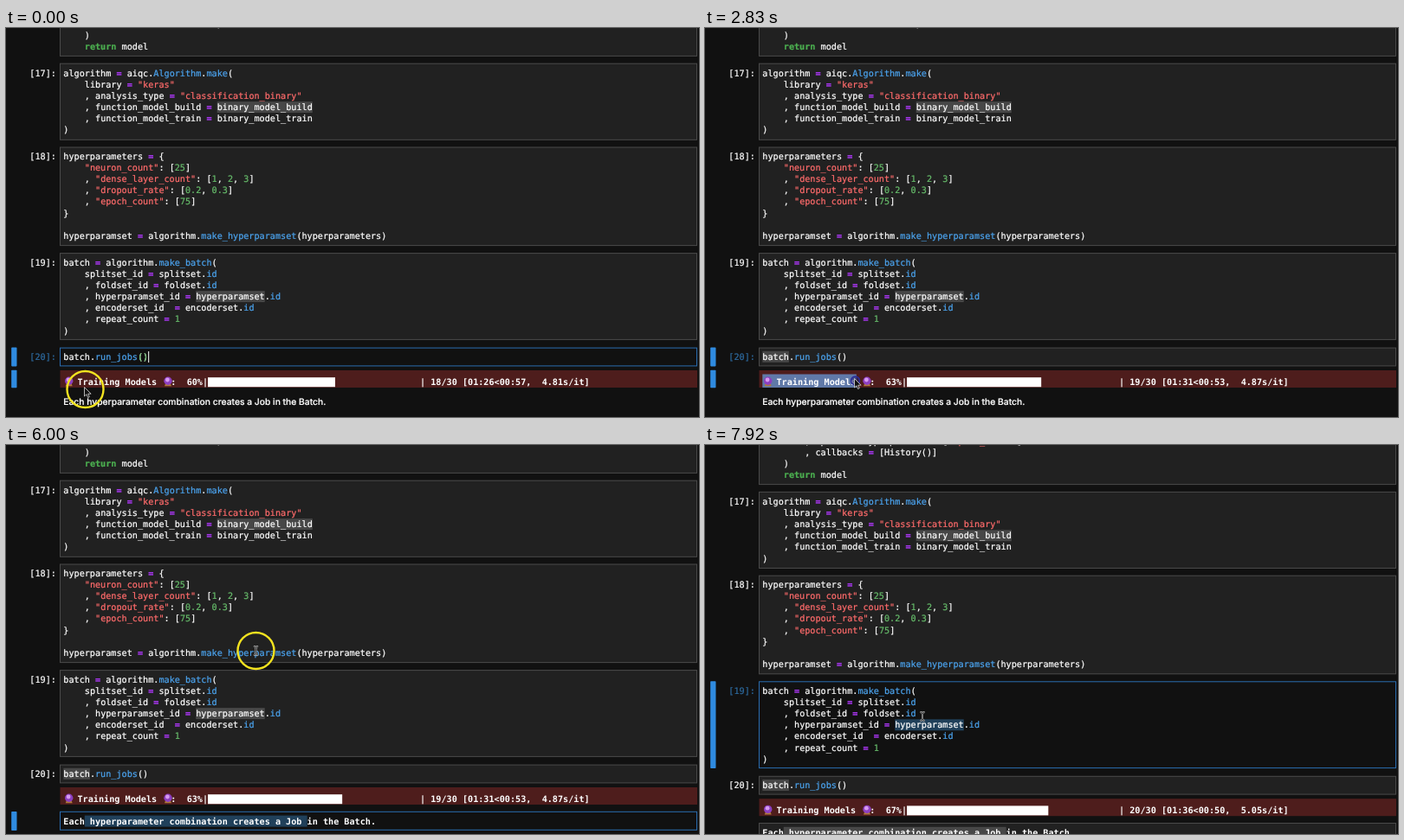
These frames come from a looping animation (800 px wide and 450 px high, 8000 ms). An HTML page:

```html
<!DOCTYPE html>
<html lang="en">
<head>
<meta charset="utf-8">
<title>Notebook training run</title>
<style>
  html, body { margin: 0; width: 100%; height: 100%; overflow: hidden; background: #111; }
  svg { display: block; width: 800px; height: 450px; }
  text {
    font: 10.16px "DejaVu Sans Mono", monospace; white-space: pre; text-rendering: geometricPrecision;
    color: #fff; fill: currentColor; stroke: currentColor; stroke-width: .22;
  }
  tspan { fill: currentColor; stroke: currentColor; }
  .bold { font-weight: 700; stroke-width: 0; }
  .prose { font: 500 10.3px Inter, sans-serif; }
  .str { color: #ff6b6b; }
  .num { color: #66bb6a; }
  .op { color: #b238ff; font-weight: 700; }
  .prop { color: #4ba3ee; }
  .key { color: #4caf50; font-weight: 700; }
  .box { fill: #212121; stroke: #4a4a4a; }
  .box.edit { fill: #111; stroke: #2a6db0; }
  .prompt.active { color: #2d6a9f; }
  .tab { fill: #2f8be0; }
</style>
</head>
<body>
<svg id="stage" viewBox="0 0 800 450"><g id="page"></g><g id="mouse"></g></svg>
<script>
const LOOP = 8000, FPS = 12;
const CHAR = 6.117, LINE = 13.18, LEFT = 66.3, BASE = 3.5;
const GREY = '#474747', SLATE = '#20405a';
const page = document.getElementById('page');
const mouse = document.getElementById('mouse');

function add(parent, tag, attrs, content) {
  const el = document.createElementNS('http://www.w3.org/2000/svg', tag);
  set(el, attrs);
  if (content) el.textContent = content;
  parent.append(el);
  return el;
}
function set(el, attrs) {
  for (const k in attrs) el.setAttribute(k, attrs[k]);
}
const show = (el, on) => { el.style.display = on ? '' : 'none'; };
const rect = (x, y, width, height, attrs) => add(page, 'rect', { x, y, width, height, ...attrs });
const sideTab = (y, height) => rect(6.2, y, 6.3, height, { class: 'tab', rx: .8 });
const text = (x, y, content, cls = '') => add(page, 'text', { x, y: y + BASE, class: cls }, content);
const col = n => LEFT + n * CHAR;
const mark = (from, count, y, fill) => rect(col(from), y - 6.4, count * CHAR, 13, { fill });

const TOKENS = /(["'][^"']*["'])|(\breturn\b)|(=)|(\b\d[\d.]*)|(\.)([A-Za-z_]+)|[^"'=.\d\s]+|\s+|./g;
function code(y, line) {
  const indent = line.search(/\S/);
  const el = text(col(indent), y, '');
  const span = (s, cls) => add(el, 'tspan', { class: cls || '' }, s);
  for (const [all, str, key, op, num, dot, prop] of line.trim().matchAll(TOKENS)) {
    if (dot) { span('.'); span(prop, 'prop'); }
    else span(all, str ? 'str' : key ? 'key' : op ? 'op' : num ? 'num' : '');
  }
}

// A notebook cell: frame, prompt, side tab, then highlights below the code
function cell(top, bottom, prompt, source, firstLine, highlights = () => {}) {
  const box = rect(62.5, top, 735, bottom - top, { class: 'box' });
  const label = text(27.3, firstLine, prompt, 'prompt');
  const tab = sideTab(top - .5, bottom - top + 1);
  const marks = highlights();
  source.split('\n').forEach((s, i) => s.trim() && code(firstLine + i * LINE, s));
  return { box, label, tab, marks };
}
function setCell(c, selected, editing) {
  c.box.classList.toggle('edit', editing);
  c.label.classList.toggle('active', selected);
  show(c.tab, selected);
}

function crystalBall(cx) {
  add(page, 'path', { d: `M${cx - 4} 414.2l1.6-4h4.8l1.6 4z`, fill: '#b07a3a' });
  add(page, 'circle', { cx, cy: 408.2, r: 4.7, fill: '#8d3fc0' });
  add(page, 'circle', { cx: cx - .6, cy: 407, r: 2.4, fill: '#d79af0' });
}

const first = cell(-60, 32.4, '', `        , epochs = hyperparameters['epoch_count']
        , callbacks = [History()]
    )
    return model`, -18.2);

const algorithm = cell(41.2, 129.3, '[17]:', `algorithm = aiqc.Algorithm.make(
    library = "keras"
    , analysis_type = "classification_binary"
    , function_model_build = binary_model_build
    , function_model_train = binary_model_train
)`, 52, () => mark(29, 18, 91.5, GREY));

const params = cell(138, 251.6, '[18]:', `hyperparameters = {
    "neuron_count": [25]
    , "dense_layer_count": [1, 2, 3]
    , "dropout_rate": [0.2, 0.3]
    , "epoch_count": [75]
}

hyperparamset = algorithm.make_hyperparamset(hyperparameters)`, 148.2);

const batch = cell(260.6, 360.4, '[19]:', `batch = algorithm.make_batch(
    splitset_id = splitset.id
    , foldset_id = foldset.id
    , hyperparamset_id = hyperparamset.id
    , encoderset_id  = encoderset.id
    , repeat_count = 1
)`, 271, () => mark(25, 13, 310.5, GREY));

const run = cell(370.1, 390.9, '[20]:', 'batch.run_jobs()', 380.2, () => mark(0, 5, 380.2, GREY));
const parens = text(col(14), 380.2, '()', 'num');
const caret = rect(col(16), 374, 1, 13, { fill: '#fff' });

rect(62.5, 396, 735.5, 20, { fill: '#4e1d1c' });
const outputTab = sideTab(395.7, 20.6);
const outputMark = rect(LEFT, 400.5, 0, 15.5, { fill: '#6079a8' });
crystalBall(72.7);
crystalBall(187);
text(82.5, 409, 'Training Models', 'bold');
const percent = text(190.3, 409, '', 'bold');
const bar = rect(233, 404.2, 0, 11, { fill: '#fff' });
const stats = text(478, 409, '', 'bold');

const SENTENCE = 'Each hyperparameter combination creates a Job in the Batch.';
const prose = text(66.3, 432.6, SENTENCE, 'prose');
const noteBox = rect(62.5, 424.3, 735, 21, { class: 'box' });
const noteTab = sideTab(424, 22);
const noteMark = mark(4, 0, 435, SLATE);
const noteText = text(LEFT, 435, SENTENCE, 'bold');

const ring = add(mouse, 'circle', { r: 21, fill: 'none', stroke: '#f2e21f', 'stroke-width': 2.4 });
const press = add(mouse, 'circle', { r: 5, fill: '#23236a', 'fill-opacity': .55, stroke: '#2c2c9c', 'stroke-width': 1.5 });
const arrow = add(mouse, 'path', { d: 'M-1-2.5v10.5l2.4-2.2 1.7 3.7 1.7-.8-1.6-3.5h3.4z', fill: '#111', stroke: '#ddd', 'stroke-width': .8 });
const beam = add(mouse, 'g', { fill: 'none' });
const BEAM = 'M-2.6-5q2.6 0 2.6 2.4V2.6q0 2.4-2.6 2.4M2.6-5q-2.6 0-2.6 2.4M2.6 5q-2.6 0-2.6-2.4';
add(beam, 'path', { d: BEAM, stroke: '#c8c8c8', 'stroke-width': 2 });
add(beam, 'path', { d: BEAM, stroke: '#222', 'stroke-width': .9 });

// time, x, y
const PATH = [
  [0, 91.5, 418], [250, 91, 417], [850, 82, 382], [1150, 82, 382], [1700, 84.5, 407],
  [1780, 84.5, 407], [1950, 67, 408], [2100, 67, 408], [2750, 173.5, 408], [3000, 173.5, 408],
  [3550, 117, 433], [3830, 117, 433], [3910, 84.5, 432], [4250, 91, 435], [4400, 91, 435],
  [5200, 348, 435], [5450, 348, 435], [5950, 288.5, 238], [6200, 288.5, 238], [6850, 251, 314], [LOOP, 251, 314]
];
const PRESSES = [[950, 1100], [2000, 2900], [3700, 3850], [4400, 5300], [6950, 7300]];
const RINGS = [[0, 750], [5450, 6800]];
const SELECT_BATCH = 1000, DRAG_OUTPUT = 1980, OPEN_NOTE = 3840, EDIT_NOTE = 4000, EDIT_BATCH = 7000;
const PROGRESS = [[0, 18, '01:26<00:57,  4.81'], [1990, 19, '01:31<00:53,  4.87'], [7000, 20, '01:36<00:50,  5.05']];
const SCROLL = [[7800, 5], [7900, 13.2]];

const within = (ranges, t) => ranges.some(([a, b]) => t >= a && t < b);
const latest = (steps, t) => steps.filter(s => s[0] <= t).pop();
function pointer(t) {
  const i = PATH.findIndex(p => p[0] > t);
  const [t0, x0, y0] = PATH[i - 1], [t1, x1, y1] = PATH[i];
  const u = (t - t0) / (t1 - t0), e = u * u * (3 - 2 * u);
  return [x0 + (x1 - x0) * e, y0 + (y1 - y0) * e];
}

function draw(t) {
  const [x, y] = pointer(t);
  const noteOpen = t >= OPEN_NOTE, inBatch = t >= EDIT_BATCH;
  const dragging = t >= DRAG_OUTPUT && !noteOpen;

  setCell(run, !noteOpen, t < DRAG_OUTPUT);
  setCell(batch, inBatch, inBatch);
  for (const c of [first, algorithm, params]) setCell(c, false, false);
  show(outputTab, !noteOpen);
  batch.marks.setAttribute('fill', inBatch ? SLATE : GREY);
  show(run.marks, t >= SELECT_BATCH);
  run.marks.setAttribute('fill', t < DRAG_OUTPUT ? SLATE : GREY);
  show(parens, t < SELECT_BATCH);
  show(caret, t < SELECT_BATCH && t % 1060 < 530);

  const reach = t > 2750 ? 174.8 : Math.min(x + 1, 174.8);
  outputMark.setAttribute('width', dragging ? Math.max(0, reach - LEFT) : 0);

  const [, done, timing] = latest(PROGRESS, t);
  percent.textContent = `:  ${Math.round(done / 30 * 100)}%|`;
  bar.setAttribute('width', 245 * done / 30);
  stats.textContent = `| ${done}/30 [${timing}s/it]`;

  show(prose, !noteOpen);
  for (const el of [noteBox, noteText, noteMark]) show(el, noteOpen);
  show(noteTab, noteOpen && !inBatch);
  noteBox.classList.toggle('edit', t >= EDIT_NOTE && !inBatch);
  const chars = t < 4400 ? 0 : t > 5200 ? 42 : Math.round((x - col(4)) / CHAR);
  set(noteMark, { width: Math.max(0, chars) * CHAR, fill: inBatch ? GREY : SLATE });

  const scroll = latest(SCROLL, t);
  page.setAttribute('transform', `translate(0 ${scroll ? scroll[1] : 0})`);

  mouse.setAttribute('transform', `translate(${x} ${y})`);
  const overOutput = y > 393 && !noteOpen;
  show(arrow, overOutput);
  show(beam, !overOutput);
  show(ring, within(RINGS, t));
  show(press, within(PRESSES, t));
}

const start = performance.now();
function tick(now) {
  const t = Math.max(0, now - start) % LOOP;
  draw(Math.min(Math.floor((t + 5) * FPS / 1000), LOOP * FPS / 1000 - 1) * 1000 / FPS);
  requestAnimationFrame(tick);
}
draw(0);
requestAnimationFrame(tick);
</script>
</body>
</html>
```
